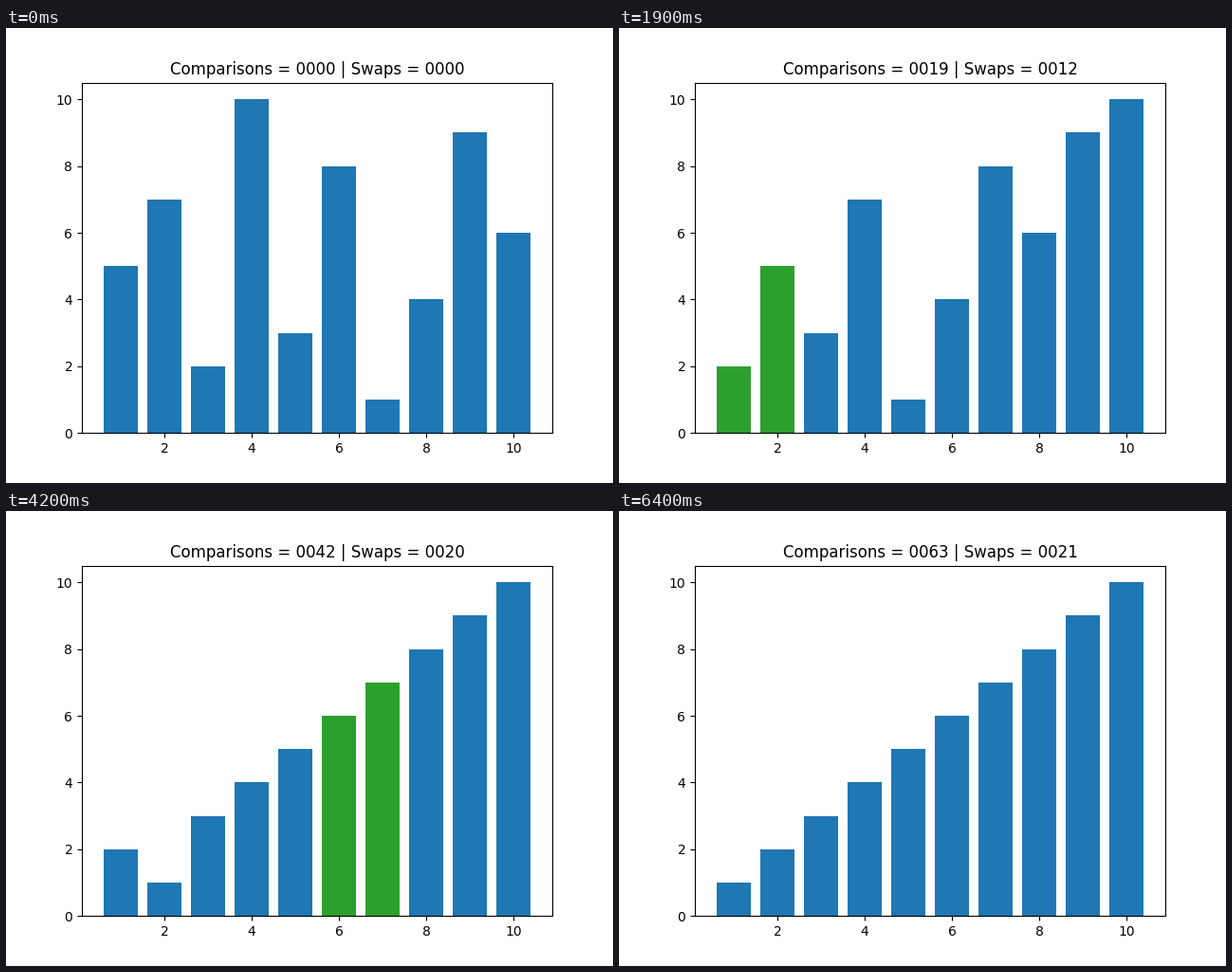
A matplotlib script for the animation above (6.5 s loop, 640x480 px).

```python
import matplotlib.pyplot as plt
from matplotlib.animation import FuncAnimation

START = [5, 7, 2, 10, 3, 8, 1, 4, 9, 6]
BASE, ACTIVE = "tab:blue", "tab:green"


def bubble_sort(values):
    """Return (values, active index or None, comparisons, swaps) per step."""
    data = list(values)
    comparisons = swaps = 0
    steps = [(list(data), None, 0, 0)]
    swapped = True
    while swapped:
        swapped = False
        for i in range(len(data) - 1):
            comparisons += 1
            if data[i] > data[i + 1]:
                data[i], data[i + 1] = data[i + 1], data[i]
                swaps += 1
                swapped = True
            steps.append((list(data), i, comparisons, swaps))
    steps.append((list(data), None, comparisons, swaps))
    return steps


steps = bubble_sort(START)

plt.rcParams["font.family"] = "DejaVu Sans"
fig, ax = plt.subplots(figsize=(6.4, 4.8), dpi=100)
bars = ax.bar(range(1, len(START) + 1), START, color=BASE)
title = ax.set_title("")


def draw(n):
    data, active, comparisons, swaps = steps[n]
    for k, (bar, height) in enumerate(zip(bars, data)):
        bar.set_height(height)
        lit = active is not None and k in (active, active + 1)
        bar.set_color(ACTIVE if lit else BASE)
        bar.set_linewidth(0)
    title.set_text(f"Comparisons = {comparisons:04d} | Swaps = {swaps:04d}")
    return [*bars, title]


anim = FuncAnimation(fig, draw, frames=len(steps), interval=100,
                     init_func=lambda: draw(0), repeat=True, repeat_delay=0)
plt.show()
```
